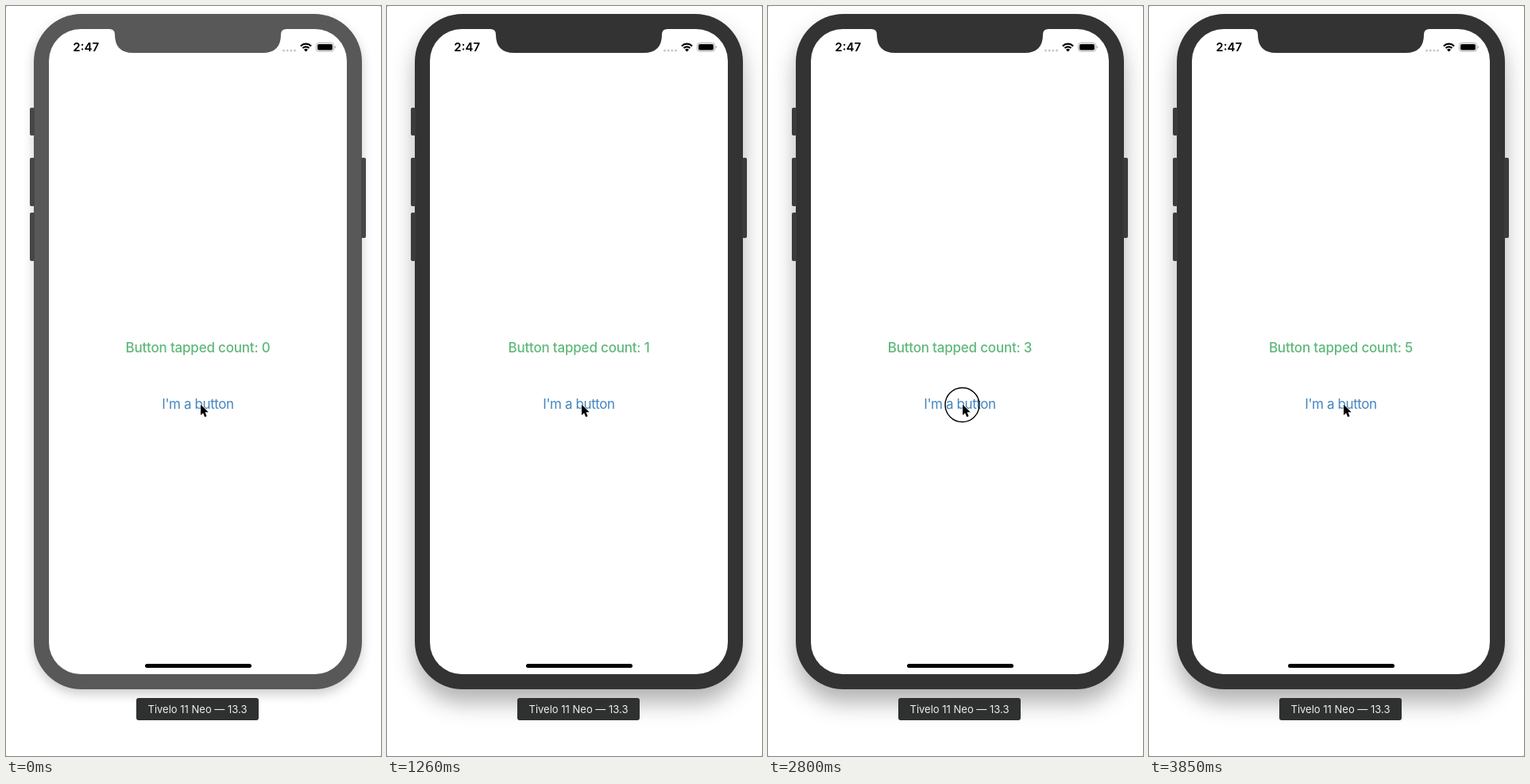
An HTML page that plays this animation: 472 px wide and 944 px high, repeating every 4.2 s.

```html
<!DOCTYPE html>
<html lang="en">
<head>
<meta charset="utf-8">
<title>Tap counter</title>
<style>
  html, body { margin: 0; width: 100%; height: 100%; overflow: hidden; background: #999; }
  svg { display: block; width: 472px; height: 944px; font-family: Inter, "Liberation Sans", sans-serif; }
  text { text-anchor: middle; }
  #device { --metal: #585858; --key: #464646; }
  #body { fill: var(--metal); filter: drop-shadow(0 6px 7px rgba(0, 0, 0, .2)); }
  #device.active { --metal: #333; --key: #3b3b3b; }
  #device.active #body { filter: drop-shadow(0 17px 14px rgba(0, 0, 0, .3)); }
  #keys { fill: var(--key); }
  #notch { fill: var(--metal); }
  #label { font-size: 17px; font-weight: 500; letter-spacing: -.2px; fill: #5fb87a; }
  #button { font-size: 17px; letter-spacing: -.4px; fill: #4485c0; }
</style>
</head>
<body>
<svg viewBox="0 0 472 944">
  <rect width="472" height="944" rx="1.5" fill="#fff"/>

  <g id="device">
    <rect id="body" x="35" y="10" width="413" height="850" rx="60"/>
    <g id="keys">
      <rect x="30" y="128" width="6" height="35" rx="2"/>
      <rect x="30" y="191" width="6" height="61" rx="2"/>
      <rect x="30" y="260" width="6" height="61" rx="2"/>
      <rect x="447" y="191" width="6" height="101" rx="2"/>
    </g>
    <rect x="54" y="29" width="375" height="812" rx="40" fill="#fff"/>
    <path id="notch" d="M130 28.5V29q7 0 7 7q0 23 23 23H323q23 0 23-23q0-7 7-7v-.5z"/>
  </g>

  <text x="100.7" y="57" font-size="15" font-weight="600">2:47</text>
  <g fill="#c8c8c8">
    <circle cx="349.5" cy="56" r="1.5"/>
    <circle cx="354.2" cy="56" r="1.5"/>
    <circle cx="358.8" cy="56" r="1.5"/>
    <circle cx="363.5" cy="56" r="1.5"/>
  </g>
  <g fill="none" stroke="#000" stroke-width="2.2">
    <path d="M370.9 50.4a9.3 9.3 0 0 1 13.2 0"/>
    <path d="M373.5 53a5.7 5.7 0 0 1 8 0"/>
    <path d="M377.5 57.6l-2.5-2.6a3.5 3.5 0 0 1 5 0z" fill="#000" stroke="none"/>
  </g>
  <rect x="390.5" y="46.5" width="22" height="10.5" rx="3" fill="none" stroke="#aaa"/>
  <rect x="392" y="48" width="19" height="7.5" rx="1.8"/>
  <path d="M413.7 50q1.4 .6 1.4 1.8t-1.4 1.8z" fill="#aaa"/>

  <text id="label" x="241.5" y="436"></text>
  <text id="button" x="241.5" y="506.5">I'm a button</text>
  <rect x="175" y="828" width="134" height="5" rx="2.5"/>

  <circle id="ring" cx="244.5" cy="502" r="21.5" fill="none" stroke="#000" stroke-width="1.4"/>
  <path d="M245 501.5v13.6l3.1-2.9 2.1 5.1 2.4-1-2.1-5h4.2z" stroke="#fff" stroke-width="1.2" paint-order="stroke"/>

  <rect x="164" y="871" width="154" height="28" rx="3" fill="#2f3030"/>
  <text x="241" y="889.5" font-size="13" fill="#eee">Tivelo 11 Neo — 13.3</text>
</svg>

<script>
  const LOOP = 4200, STEP = 70;
  const taps = [
    { down: 980, fade: 1120, end: 1260 },
    { down: 1540, fade: 1750, end: 1960 },
    { down: 2100, fade: 2240, end: 2520 },
    { down: 2800, fade: 2940, end: 3150 },
    { down: 3430, fade: 3570, end: 3850 },
  ];
  const [device, label, button, ring] =
    ['device', 'label', 'button', 'ring'].map(id => document.getElementById(id));

  // Dims one step after the press, then eases back once released.
  function buttonOpacity(tap, time) {
    if (!tap || time < tap.down + STEP) return 1;
    if (time < tap.down + 2 * STEP) return .2;
    const progress = Math.min(1, Math.max(0, (time - tap.fade) / (tap.end - tap.fade)));
    return .3 + .7 * progress ** 2;
  }

  function draw(now) {
    const time = Math.floor(now % LOOP / STEP) * STEP;
    const tap = taps.filter(({ down }) => time >= down).pop();
    const count = taps.filter(({ down }) => time >= down + 2 * STEP).length;

    device.classList.toggle('active', Boolean(tap));
    label.textContent = `Button tapped count: ${count}`;
    button.style.opacity = buttonOpacity(tap, time);
    ring.style.visibility = tap && time < tap.down + 2 * STEP ? 'visible' : 'hidden';
  }

  const start = performance.now();
  function tick() {
    draw(performance.now() - start);
    requestAnimationFrame(tick);
  }
  tick();
</script>
</body>
</html>
```
